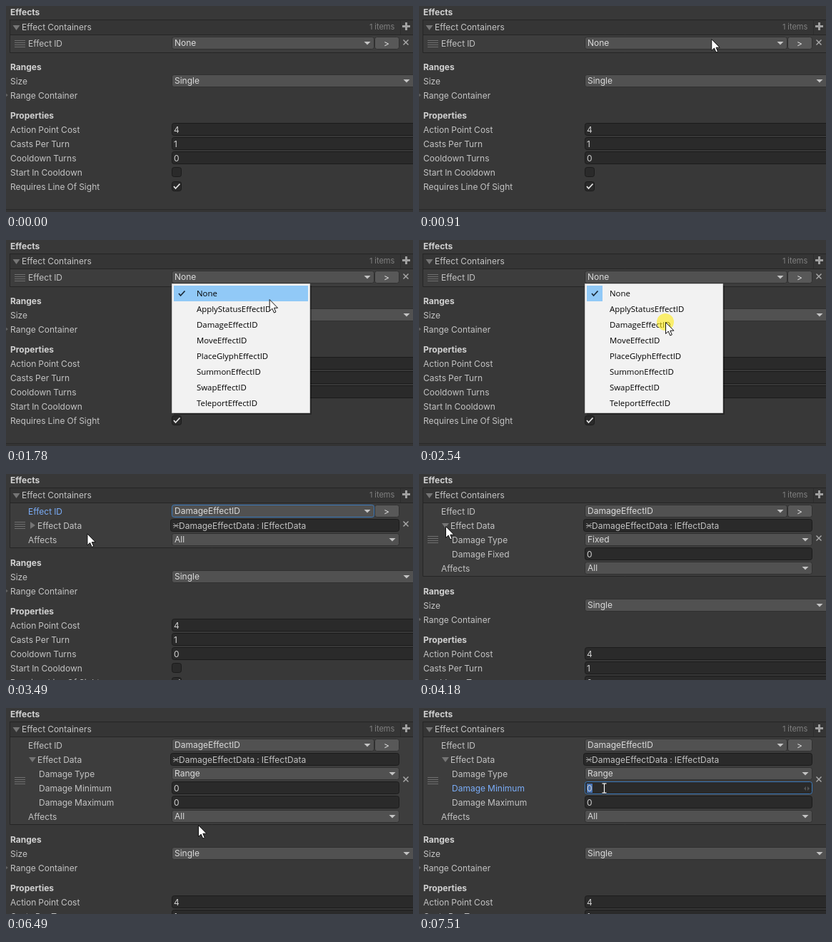
Write an HTML page with a canvas that moves like this. It is 570x289 px and loops after 8000 ms.

```html
<!DOCTYPE html>
<html lang="en">
<head>
<meta charset="utf-8">
<title>Effect inspector</title>
<style>
  html, body { margin: 0; width: 100%; height: 100%; overflow: hidden; background: #383838; }
  canvas { display: block; }
</style>
</head>
<body>
<canvas id="stage" width="570" height="289"></canvas>
<script>
const stageCtx = document.getElementById('stage').getContext('2d');
const menuLayer = new OffscreenCanvas(570, 289);
const menuCtx = menuLayer.getContext('2d');
let ctx = stageCtx;

const LOOP = 8000;
const UI = 'Inter, sans-serif';
const MENU_FONT = '11.4px "Open Sans", sans-serif';
const LABEL = '#c4c4c4', BLUE = '#7baefa', FOCUS = '#3a79bb';
const MENU_ITEMS = ['None', 'ApplyStatusEffectID', 'DamageEffectID', 'MoveEffectID',
  'PlaceGlyphEffectID', 'SummonEffectID', 'SwapEffectID', 'TeleportEffectID'];

// Pointer moves: start, end, target x, target y
const MOVES = [
  [40, 840, 409, 46], [900, 980, 410, 46], [1600, 1990, 352, 98], [2010, 2210, 345, 115],
  [3210, 3770, 37, 73], [4550, 5140, 269, 93], [5560, 6020, 269, 164], [6590, 7040, 259, 112]
];
const CLICKS = [[1250, 1380], [2480, 2680], [4040, 4180], [5200, 5330], [6350, 6480], [7440, 7505]];

const clamp = v => Math.max(0, Math.min(1, v));

function pointerAt(t) {
  let x = 572, y = 235;
  for (const [start, end, tx, ty] of MOVES) {
    const p = 1 - (1 - clamp((t - start) / (end - start))) ** 2;
    x += (tx - x) * p;
    y += (ty - y) * p;
  }
  return [x, y];
}

// y is the centre of the row
function text(str, x, y, color = LABEL, font = '12px ' + UI) {
  ctx.font = font;
  ctx.wordSpacing = '-0.3px';
  ctx.fillStyle = color;
  ctx.fillText(str, x, y + 5);
}

function rect(x, y, w, h, fill) {
  ctx.fillStyle = fill;
  ctx.fillRect(x, y, w, h);
}

function box(x, y, w, h, fill, border, radius = 3) {
  ctx.beginPath();
  ctx.roundRect(x + .5, y + .5, w - 1, h - 1, radius);
  ctx.fillStyle = fill;
  ctx.fill();
  ctx.lineWidth = 1;
  ctx.strokeStyle = border;
  ctx.stroke();
}

function polygon(points, fill) {
  ctx.beginPath();
  points.forEach(([x, y]) => ctx.lineTo(x, y));
  ctx.closePath();
  ctx.fillStyle = fill;
  ctx.fill();
}

function line(points, color, width = 1) {
  ctx.beginPath();
  points.forEach(([x, y], i) => i ? ctx.lineTo(x, y) : ctx.moveTo(x, y));
  ctx.strokeStyle = color;
  ctx.lineWidth = width;
  ctx.stroke();
}

function cross(x, y, r, color, width) {
  line([[x - r, y - r], [x + r, y + r]], color, width);
  line([[x - r, y + r], [x + r, y - r]], color, width);
}

function check(x, y, color) {
  line([[x - 4, y], [x - 1.5, y + 3], [x + 4.5, y - 3.5]], color, 1.8);
}

function foldout(x, y, open, color = '#757575') {
  polygon(open ? [[x - 5, y - 3], [x + 5, y - 3], [x, y + 4]]
               : [[x - 3, y - 5], [x + 4, y], [x - 3, y + 5]], color);
}

function dropdown(value, y, right, border = '#303030') {
  box(232, y - 9, right - 232, 18, '#515151', border);
  text(value, 236, y - 1, '#dadada');
  const x = Math.min(right, 571) - 10;
  polygon([[x - 4.5, y - 2], [x + 4.5, y - 2], [x, y + 2.5]], LABEL);
}

function field(value, y, right, focused) {
  box(232, y - 9, right - 232, 18, '#2a2a2a', focused ? FOCUS : '#1b1b1b');
  if (focused) {
    rect(235, y - 6, 8, 13, '#4772b3');
    polygon([[542, y - 2], [542, y + 4], [539, y + 1]], '#555');
    polygon([[544, y - 2], [544, y + 4], [547, y + 1]], '#555');
  }
  text(value, 235, y, '#d2d2d2');
}

function checkbox(y, on) {
  box(232, y - 7, 14, 14, '#2a2a2a', '#1b1b1b');
  if (on) check(239, y, '#e4e4e4');
}

function heading(str, y) {
  text(str, 6, y, '#d2d2d2', 'bold 12px ' + UI);
}

function drawEffects(stage, t) {
  const bottom = [66, 104, 144, 164][stage];
  heading('Effects', 8);
  box(5, 19, 570, bottom - 19, '#3d3d3d', '#252525', 0);
  box(5, 19, 570, 22, '#353535', '#252525', 0);
  foldout(14.5, 30, true);
  text('Effect Containers', 22, 29);
  text('1 items', 509, 28, '#808080', '11px ' + UI);
  rect(552, 20, 1, 20, '#2c2c2c');
  rect(555, 27, 11, 3, '#a0a0a0');
  rect(559, 23, 3, 11, '#a0a0a0');

  const mid = Math.floor((bottom + 40) / 2);
  for (let i = 0; i < 4; i++) rect(12, mid - 5 + i * 3, 15, 1, '#707070');
  cross(560, mid - 2, 3.5, '#a8a8a8', 1.5);

  const focused = stage === 1 && t < 4040;
  text('Effect ID', 31, 52, focused ? BLUE : LABEL);
  dropdown(stage ? 'DamageEffectID' : 'None', 52, 516, focused ? FOCUS : undefined);
  box(516, 43, 35, 18, '#585858', '#303030');
  text('>', 529, 52, '#e0e0e0');
  if (!stage) return;

  foldout(37, 72, stage > 1);
  text('Effect Data', 44, 72);
  box(230, 63, 321, 18, '#2a2a2a', '#1b1b1b');
  line([[234, 72.5], [242, 72.5]], '#aaa');
  cross(238, 72.5, 3.5, '#aaa', 1);
  text('DamageEffectData : IEffectData', 242, 72);

  if (stage > 1) {
    text('Damage Type', 46, 92);
    dropdown(stage === 2 ? 'Fixed' : 'Range', 92, 551);
    const editing = t >= 7505;
    text(stage === 2 ? 'Damage Fixed' : 'Damage Minimum', 46, 112, editing ? BLUE : LABEL);
    field('0', 112, 551, editing);
  }
  if (stage > 2) {
    text('Damage Maximum', 46, 132);
    field('0', 132, 551);
  }
  const last = [0, 92, 132, 152][stage];
  text('Affects', 31, last);
  dropdown('All', last, 551);
}

function drawSettings(offset) {
  ctx.save();
  ctx.translate(0, offset);
  heading('Ranges', 85);
  text('Size', 6, 105);
  dropdown('Single', 105, 576);
  foldout(-1, 125, false, '#606060');
  text('Range Container', 6, 125);
  heading('Properties', 153);
  ['Action Point Cost', 'Casts Per Turn', 'Cooldown Turns', 'Start In Cooldown', 'Requires Line Of Sight']
    .forEach((name, i) => text(name, 6, 173 + i * 20));
  ['4', '1', '0'].forEach((value, i) => field(value, 173 + i * 20, 576));
  checkbox(233, false);
  checkbox(253, true);
  rect(0, 285, 570, 1, '#2a2a2a');
  rect(0, 286, 570, 3, '#343434');
  ctx.restore();
}

// The menu is built on its own layer so that it fades as one piece
function drawMenu(t, py) {
  const alpha = clamp((t - 1250) / 195) * clamp((2680 - t) / 100);
  if (!alpha) return;
  ctx = menuCtx;
  ctx.clearRect(0, 0, 570, 289);
  rect(235, 64, 193, 181, 'rgba(0,0,0,.3)');
  box(232, 61, 194, 182, '#f2f2f2', '#c4c4c4', 0);
  const hover = Math.floor((py - 64) / 22);
  if (hover >= 0 && t < 2480) rect(235, 64 + hover * 22, 188, 22, '#91c9f7');
  rect(235, 64, 22, 22, '#91c9f7');
  check(246, 75, '#1c2b3a');
  MENU_ITEMS.forEach((name, i) => text(name, 267, 74 + i * 22, '#000', MENU_FONT));
  ctx = stageCtx;
  ctx.globalAlpha = alpha;
  ctx.drawImage(menuLayer, 0, 0);
  ctx.globalAlpha = 1;
}

function drawSearchPopup() {
  box(232, 103, 160, 65, '#383838', '#191919', 0);
  box(239, 107, 131, 16, '#2a2a2a', FOCUS);
  ctx.beginPath();
  ctx.arc(246.5, 114.5, 2.2, 0, 7);
  ctx.strokeStyle = LABEL;
  ctx.stroke();
  line([[248, 116], [250.5, 118.5]], LABEL, 1.4);
  rect(253, 109, 1, 12, LABEL);
  text('Search', 256, 114, '#7f7f7f', '11px ' + UI);
  cross(376, 115, 2.5, '#b0b0b0', 1);
  rect(233, 125, 158, 21, '#3e5f96');
  text('Fixed', 249, 135, '#e0e0e0');
  text('Range', 249, 157);
}

function drawPointer(x, y, beam) {
  if (beam) {
    for (const [color, width] of [['#222', 3], ['#fff', 1.2]]) {
      line([[x + .5, y - 6], [x + .5, y + 7]], color, width);
      line([[x - 2.5, y - 6], [x + 3.5, y - 6]], color, width);
      line([[x - 2.5, y + 7], [x + 3.5, y + 7]], color, width);
    }
    return;
  }
  const shape = [[0, 0], [0, 16], [3.7, 12.6], [6.3, 18.5], [8.8, 17.4], [6.3, 11.7], [11.4, 11.7]];
  polygon(shape.map(([dx, dy]) => [x + dx + .5, y + dy + .5]), '#fff');
  ctx.strokeStyle = '#111';
  ctx.lineWidth = 1;
  ctx.stroke();
}

function draw(t) {
  const stage = [2680, 4110, 6420].filter(time => t >= time).length;
  const [x, y] = pointerAt(t);
  rect(0, 0, 570, 289, '#383838');
  drawEffects(stage, t);
  drawSettings([0, 39, 79, 99][stage]);
  drawMenu(t, y);
  if (t >= 5320 && t < 6420) drawSearchPopup();
  if (CLICKS.some(([start, end]) => t >= start && t < end)) {
    ctx.beginPath();
    ctx.arc(x, y, 12, 0, 7);
    ctx.fillStyle = 'rgba(255,235,20,.6)';
    ctx.fill();
  }
  drawPointer(x, y, stage === 3 && y < 143);
}

function tick() {
  draw(performance.now() % LOOP);
  requestAnimationFrame(tick);
}
tick();
</script>
</body>
</html>
```
